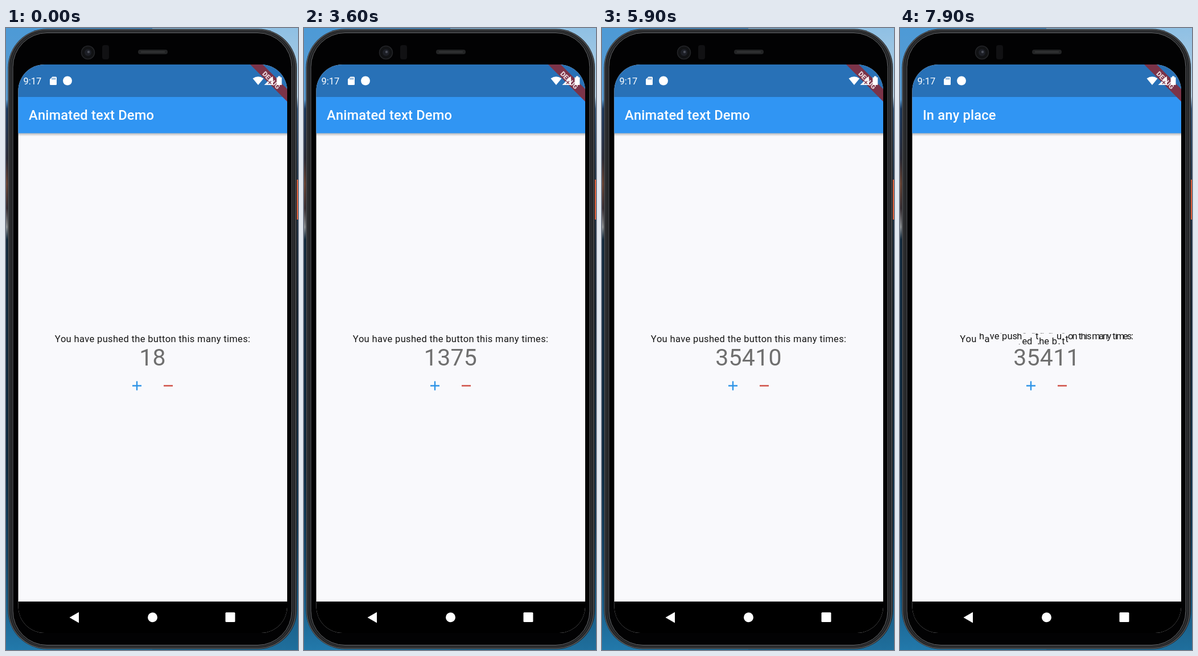
Animation of 513x1091 px, one loop 8000 ms. Source, as an HTML page:

```html
<!DOCTYPE html>
<html lang="en">
<head>
<meta charset="utf-8">
<title>Rolling text</title>
<style>
  html, body { margin: 0; width: 100%; height: 100%; overflow: hidden; background: #000; }
  svg { display: block; width: 513px; height: 1091px; font-family: Roboto, sans-serif; }
  text { white-space: pre; }
</style>
</head>
<body>
<svg id="stage" viewBox="0 0 513 1091" xmlns="http://www.w3.org/2000/svg">
  <defs>
    <linearGradient id="left" x1="0" y1="0" x2="0" y2="1">
      <stop offset="0" stop-color="#4d9ad6"/>
      <stop offset=".115" stop-color="#5b9bd0"/>
      <stop offset=".13" stop-color="#1d3c63"/>
      <stop offset=".21" stop-color="#2b2c38"/>
      <stop offset=".25" stop-color="#6b4636"/>
      <stop offset=".29" stop-color="#3a3136"/>
      <stop offset=".32" stop-color="#8b8f92"/>
      <stop offset=".34" stop-color="#142c40"/>
      <stop offset=".7" stop-color="#0d2a40"/>
      <stop offset=".85" stop-color="#15486c"/>
      <stop offset="1" stop-color="#2279ab"/>
    </linearGradient>
    <linearGradient id="right" x1="0" y1="0" x2="0" y2="1">
      <stop offset="0" stop-color="#8fc0e4"/>
      <stop offset=".11" stop-color="#b4cfe2"/>
      <stop offset=".13" stop-color="#35577a"/>
      <stop offset=".23" stop-color="#23384d"/>
      <stop offset=".45" stop-color="#101f2c"/>
      <stop offset=".8" stop-color="#0f3550"/>
      <stop offset="1" stop-color="#1f6f9d"/>
    </linearGradient>
    <linearGradient id="shade" x1="0" y1="0" x2="0" y2="1">
      <stop offset="0" stop-color="#000" stop-opacity=".28"/>
      <stop offset="1" stop-color="#000" stop-opacity="0"/>
    </linearGradient>
    <clipPath id="screen"><rect x="21.5" y="64" width="472.5" height="997" rx="46"/></clipPath>
  </defs>

  <!-- wallpaper -->
  <rect width="257" height="1091" fill="url(#left)"/>
  <rect x="257" width="256" height="1091" fill="url(#right)"/>
  <rect x="510.5" y="266" width="2.5" height="70" fill="#e0633f"/>

  <!-- phone body -->
  <rect x="3.5" y="1.5" width="507.5" height="1088" rx="68" fill="#17181a"/>
  <rect x="5" y="3" width="504" height="1085" rx="66" fill="none" stroke="#55575a" stroke-width="1.6"/>
  <rect x="8.5" y="6" width="497" height="1079" rx="63" fill="none" stroke="#2d2e30" stroke-width="3"/>
  <rect x="12" y="8.5" width="490" height="1074" rx="60" fill="#020203" stroke="#6b6d70" stroke-width="1"/>
  <circle cx="144" cy="43" r="11.5" fill="#111214" stroke="#242528" stroke-width="1.5"/>
  <circle cx="144" cy="43" r="6" fill="#1d1f26"/>
  <circle cx="145" cy="42" r="2.2" fill="#4b4e58"/>
  <rect x="169" y="30" width="12" height="25" rx="4" fill="#111113"/>
  <rect x="232" y="38" width="52" height="8" rx="4" fill="#232425"/>
  <path d="M237 42H279" stroke="#343536" stroke-width="2"/>

  <!-- screen -->
  <g clip-path="url(#screen)">
    <rect x="21" y="64" width="474" height="998" fill="#f9f9fc"/>
    <rect x="21" y="184" width="474" height="6" fill="url(#shade)"/>
    <rect x="21" y="120" width="474" height="64.5" fill="#3095f3"/>
    <rect x="21" y="64" width="474" height="57" fill="#2871b7"/>
    <rect x="21" y="1006" width="474" height="56" fill="#000"/>
    <path d="M429 64H451L494 107V129Z" fill="#7b3348"/>
    <text transform="translate(466 91.5) rotate(45)" y="4.3" text-anchor="middle" font-size="12" font-weight="900" fill="#e8d5da">DEBUG</text>
  </g>

  <!-- status bar -->
  <g fill="#fff">
    <text x="30.5" y="98.5" font-size="16.5">9:17</text>
    <path d="M81.5 85.5H87.5Q89 85.5 89 87V98.5Q89 100 87.500 100H78.5Q77 100 77 98.500V90Z"/>
    <circle cx="108" cy="92.500" r="8"/>
    <path d="M433.500 88.500Q443 82 452.500 88.500L443 100Z"/>
    <path d="M453.500 100L469 84.500V100Z" fill-opacity=".92"/>
    <path d="M478 84.500H482V86.500H484.500V100H475.500V86.500H478Z"/>
  </g>
  <path d="M81.200 87.500v3M83.700 87.500v3M86.200 87.500v3" stroke="#2871b7" stroke-width="1.200"/>
  <path d="M461 93l5 5m0-5l-5 5" stroke="#7b3348" stroke-width="1.300"/>

  <!-- buttons -->
  <path d="M230 619.500V635.500M222 627.500H238" stroke="#2f94e6" stroke-width="2.400"/>
  <path d="M277 627.500H293" stroke="#cf4a40" stroke-width="2.400"/>

  <!-- navigation -->
  <g fill="#fff">
    <path d="M111.500 1034L128 1024.500V1043.500Z"/>
    <circle cx="257.500" cy="1033.800" r="8.500"/>
    <rect x="385.500" y="1025" width="17" height="17" rx="1.500"/>
  </g>
</svg>

<script>
const NS = 'http://www.w3.org/2000/svg';
const LOOP = 8000, ROLL = 500;
const stage = document.getElementById('stage');
const ruler = document.createElement('canvas').getContext('2d');

function make(tag, attrs, parent) {
  const el = document.createElementNS(NS, tag);
  for (const key in attrs) el.setAttribute(key, attrs[key]);
  return parent.appendChild(el);
}

const LONG = 'Animated text Demo', SHORT = 'In any place';

// Each step is [start time, new text, optional roll directions].
const rows = [
  {
    id: 'title', size: 23.7, weight: 500, gap: 0.18, color: '#fff', x: 40, align: 0, base: 161,
    steps: [[-ROLL, LONG], [6050, SHORT], [6660, LONG], [7300, SHORT]]
  },
  {
    id: 'label', size: 16.5, weight: 400, gap: 0.335, color: '#161616', x: 257.5, align: 0.5, base: 550.7,
    steps: [
      [-ROLL, 'You have pushed the button this many times:'],
      [7780, 'You can tap to add a lot', '----u-uuduuuuddduddddud-']
    ]
  },
  {
    id: 'count', size: 41, weight: 400, gap: 0.3, color: '#6f6f6f', x: 257.5, align: 0.5, base: 591.7,
    steps: [
      [-ROLL, '18'], [600, '19'], [1200, '20'], [1750, '21'], [2310, '22'],
      [2950, '1375'], [4500, '21849'], [5350, '35410'], [6000, '35411']
    ]
  }
];

function setup(row) {
  const top = row.base - row.size * 0.927;
  row.height = row.size * 1.172;
  row.widths = {};
  row.pool = [];
  const clip = make('clipPath', { id: row.id }, stage);
  make('rect', { x: 0, y: top, width: 513, height: row.height }, clip);
  row.group = make('g', {
    'clip-path': `url(#${row.id})`, 'font-size': row.size, 'font-weight': row.weight,
    fill: row.color, 'text-anchor': 'middle'
  }, stage);
}

function widthOf(row, ch) {
  if (!ch) return 0;
  if (!(ch in row.widths)) {
    ruler.font = `${row.weight} ${row.size}px Roboto, sans-serif`;
    row.widths[ch] = ruler.measureText(ch).width + row.gap;
  }
  return row.widths[ch];
}

// +1 rolls upwards, -1 downwards.
function direction(from, to, hint) {
  if (hint === 'u') return 1;
  if (hint === 'd') return -1;
  return !from || !to || to > from ? 1 : -1;
}

function drawRow(row, time) {
  let n = 0;
  while (n + 1 < row.steps.length && row.steps[n + 1][0] <= time) n++;
  const [start, next, hints = ''] = row.steps[n];
  const prev = n ? row.steps[n - 1][1] : next;
  const p = Math.min(1, (time - start) / ROLL);

  const slots = [];
  let total = 0;
  for (let i = 0; i < Math.max(prev.length, next.length); i++) {
    const from = prev[i] || '', to = next[i] || '';
    const width = widthOf(row, from) * (1 - p) + widthOf(row, to) * p;
    slots.push({ from, to, width, dir: direction(from, to, hints[i]) });
    total += width;
  }

  let used = 0;
  const put = (ch, x, dy) => {
    if (!ch || ch === ' ') return;
    const el = row.pool[used] || (row.pool[used] = make('text', {}, row.group));
    used++;
    if (el.textContent !== ch) el.textContent = ch;
    el.setAttribute('x', x.toFixed(2));
    el.setAttribute('y', (row.base + dy).toFixed(2));
  };

  let x = row.x - total * row.align;
  for (const { from, to, width, dir } of slots) {
    const mid = x + (width - row.gap) / 2;
    if (from === to) put(to, mid, 0);
    else {
      if (p < 1) put(from, mid, -dir * p * row.height);
      if (p > 0) put(to, mid, dir * (1 - p) * row.height);
    }
    x += width;
  }
  for (let i = used; i < row.pool.length; i++) row.pool[i].textContent = '';
}

function draw(time) {
  for (const row of rows) drawRow(row, time);
}

rows.forEach(setup);
draw(0);
const begin = performance.now();
function tick() {
  draw((performance.now() - begin) % LOOP);
  requestAnimationFrame(tick);
}
requestAnimationFrame(tick);
</script>
</body>
</html>
```
